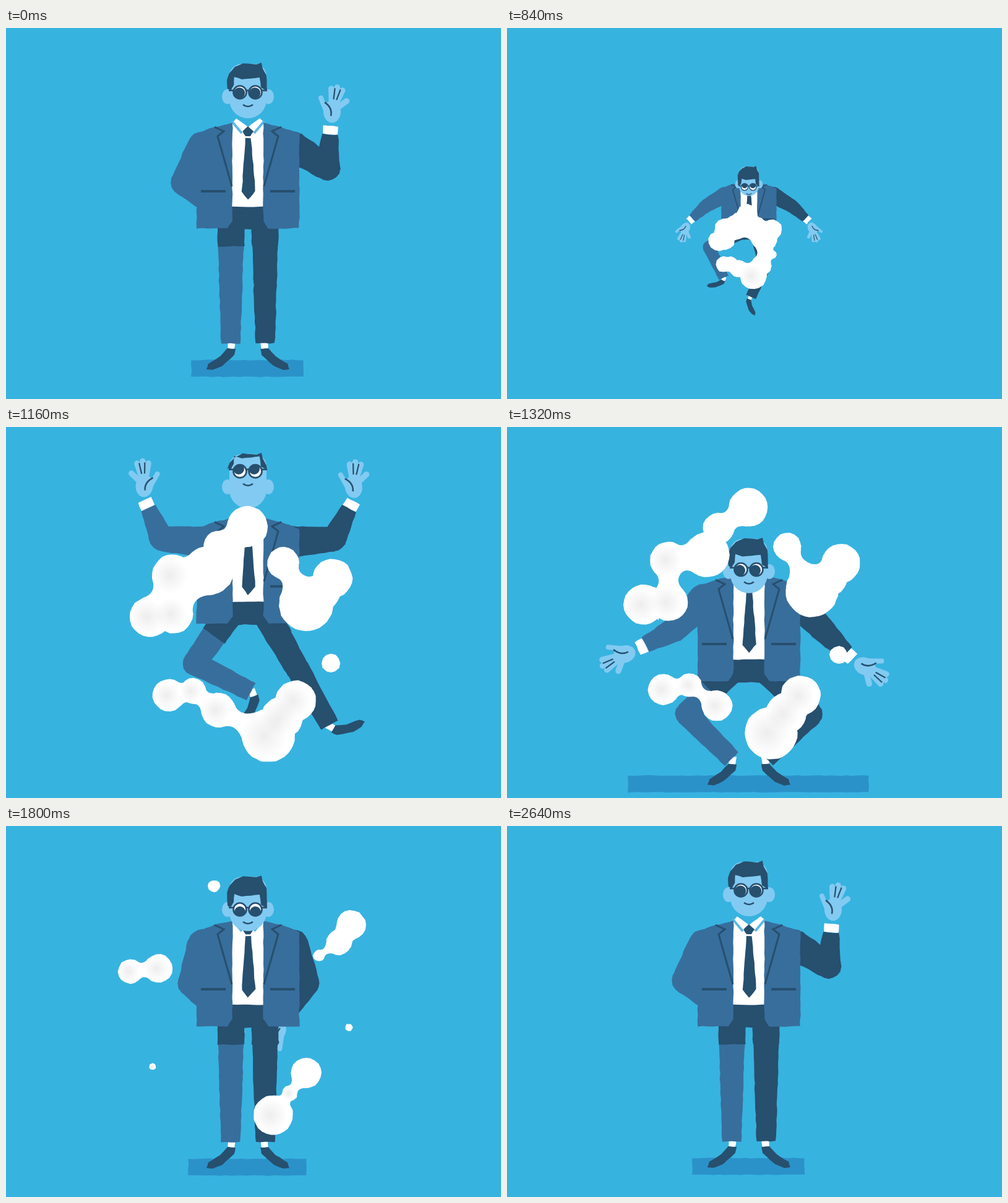
Recreate the animation shown at these times as an HTML page with a canvas. Size 800 by 600 pixels, loop 2680 ms.

```html
<!DOCTYPE html>
<html lang="en">
<head>
<meta charset="utf-8">
<title>Jumping in to say hello</title>
<style>
html, body { margin: 0; width: 100%; height: 100%; overflow: hidden; background: #37b3e0; }
canvas { display: block; width: 100vw; height: 100vh; }
</style>
</head>
<body>
<canvas id="stage" width="800" height="600"></canvas>
<script>
const ctx = document.getElementById('stage').getContext('2d');
const LOOP = 2680, STEP = 40, MID = 391;
const EXIT = 560, ENTER = 680, LEAP = 1160, LAND = 1360;
const BG = '#37b3e0', SUIT = '#386e9c', DARK = '#274f6e', SKIN = '#82caf1',
      ACCENT = '#5db8e4', FLOOR = '#2b92c9', WHITE = '#fff';

// Key poses. head: drop, tilt; gaze: pupil shift; arms: upper angle, forearm angle,
// hand turn; legs: ankle x, y, foot turn. Left limbs are given mirrored.
const STANDING = [419, 510, 0];
const POSES = [
  { time: 840, head: [48, 15], gaze: [0, -5],
    leftArm: [30, 42, 150], rightArm: [30, 42, 150], leftLeg: [467, 441, -21], rightLeg: [397, 499, 31] },
  { time: LEAP, head: [-8, -18], gaze: [-2, -4],
    leftArm: [-4, -66, -8], rightArm: [-4, -63, -8], leftLeg: [386, 428, 26], rightLeg: [523, 482, -53] },
  { time: 1440, head: [64, 18], gaze: [-2, 5],
    leftArm: [79, 88, 180], rightArm: [79, 115, 190], leftLeg: STANDING, rightLeg: STANDING },
  { time: 1800, head: [24, 7], gaze: [0, 4],
    leftArm: [72, 130, 260], rightArm: [70, 121, 210], leftLeg: STANDING, rightLeg: STANDING },
  { time: 2000, head: [0, 0], gaze: [-.8, 1.2],
    leftArm: [61, 137, 250], rightArm: [32, -86, 0], leftLeg: STANDING, rightLeg: STANDING }
];

// Puffs of the burst: x, y, radius, life in ms
const PUFFS = [
  [390, 161, 33, 520], [345, 193, 26, 690], [328, 232, 40, 390], [270, 240, 34, 330],
  [233, 307, 33, 800], [271, 303, 31, 960], [448, 220, 26, 330], [485, 286, 44, 655],
  [528, 245, 32, 960], [512, 268, 28, 960], [525, 382, 15, 700], [263, 434, 26, 655],
  [302, 427, 21, 400], [343, 458, 28, 345], [424, 499, 43, 960], [468, 443, 33, 960], [446, 470, 34, 690]
];

const ramp = (t, from, to) => Math.min(1, Math.max(0, (t - from) / (to - from)));
const smooth = (t, from, to) => { const u = ramp(t, from, to); return u * u * (3 - 2 * u); };
const mix = (a, b, u) => a + (b - a) * u;
const rad = deg => deg * Math.PI / 180;
const polar = (p, deg, len) => [p[0] + len * Math.cos(rad(deg)), p[1] + len * Math.sin(rad(deg))];

function poseAt(t) {
  const n = Math.max(1, POSES.findIndex(p => p.time > t));
  const i = t >= POSES.at(-1).time ? POSES.length - 1 : n;
  const a = POSES[i - 1], b = POSES[i], u = smooth(t, a.time, b.time), pose = {};
  for (const key in a) if (key !== 'time') pose[key] = a[key].map((v, k) => mix(v, b[key][k], u));
  const swing = 1.7 * smooth(t, 1800, 2000) * (1 - smooth(t, 2000, 2320));
  [16, 20, 38].forEach((amount, k) => pose.rightArm[k] += amount * swing);
  return pose;
}

// Up a little, free fall, then push up out of the squat
function bodyY(t) {
  if (t < 1080) return -18 * smooth(t, 840, 1080);
  if (t < LAND) return mix(-18, 125, ramp(t, 1080, LAND) ** 2);
  return 125 * (1 - smooth(t, LAND + 20, 1790));
}

const impact = t => t < LAND ? 36 * smooth(t, 1240, LAND) : 36 * Math.exp((LAND - t) / 130);

// Hand-cut edges: fixed wobble plus a faint boil
let seed = 0, tick = 0;
const hash = n => { const s = Math.sin(n * 127.1) * 43758.5453; return s - Math.floor(s) - .5; };
const wobble = amp => { seed++; return amp * (hash(seed) * 1.4 + hash(seed + tick * 17.3) * .3); };

function shape(points, color, amp = .9) {
  ctx.beginPath();
  points.forEach((p, i) => {
    const q = points[(i + 1) % points.length];
    const n = Math.ceil(Math.hypot(q[0] - p[0], q[1] - p[1]) / 9) || 1;
    for (let k = 0; k < n; k++)
      ctx.lineTo(mix(p[0], q[0], k / n) + wobble(amp), mix(p[1], q[1], k / n) + wobble(amp));
  });
  ctx.fillStyle = color;
  ctx.fill();
}

function disc(x, y, r, color) {
  const n = Math.max(12, Math.round(r * .8));
  shape(Array.from({ length: n }, (_, i) => polar([x, y], i / n * 360, r)), color);
}

function ellipse(x, y, rx, ry, color) {
  ctx.beginPath();
  ctx.ellipse(x, y, rx, ry, 0, 0, 7);
  ctx.fillStyle = color;
  ctx.fill();
}

const box = (x, y, w, h, color) => shape([[x, y], [x + w, y], [x + w, y + h], [x, y + h]], color);

function line(points, color, width, cap = 'butt') {
  ctx.beginPath();
  points.forEach(p => ctx.lineTo(...p));
  ctx.strokeStyle = color;
  ctx.lineWidth = width;
  ctx.lineCap = cap;
  ctx.stroke();
}

function curve(a, c, b) {
  ctx.beginPath();
  ctx.moveTo(...a);
  ctx.quadraticCurveTo(...c, ...b);
  ctx.strokeStyle = DARK;
  ctx.lineWidth = 2.5;
  ctx.stroke();
}

function bone(a, b, ra, rb, color) {
  const deg = Math.atan2(b[1] - a[1], b[0] - a[0]) * 180 / Math.PI;
  shape([polar(a, deg + 90, ra), polar(b, deg + 90, rb), polar(b, deg - 90, rb), polar(a, deg - 90, ra)], color);
}

function placed([x, y], turn, draw) {
  ctx.save();
  ctx.translate(x, y);
  ctx.rotate(rad(turn));
  draw();
  ctx.restore();
}

function mirrored(draw) {
  ctx.save();
  ctx.translate(2 * MID, 0);
  ctx.scale(-1, 1);
  draw();
  ctx.restore();
}

function hand() {
  const palm = [2, -20];
  ellipse(...palm, 14, 18, SKIN);
  for (const [deg, length] of [[-92, 37], [-78, 40], [-64, 38], [-36, 29]])
    line([palm, polar(palm, deg, length)], SKIN, 9.5, 'round');
  line([[-5, -14], [-16, -42]], SKIN, 8, 'round');
  for (const deg of [-83, -69]) line([polar(palm, deg, 20), polar(palm, deg, 38)], DARK, 2.2);
  curve([-10, -35], [3, -26], [0, -13]);
}

function arm([upper, fore, turn], dy, color) {
  const shoulder = [464, 192 + dy], elbow = polar(shoulder, upper, 66);
  const wrist = polar(elbow, fore, 55), cuff = polar(wrist, fore, 14);
  placed(polar(cuff, fore, 3), turn, hand);
  bone(wrist, cuff, 12, 11.5, WHITE);
  disc(...shoulder, 25, color);
  bone(shoulder, elbow, 25, 20, color);
  disc(...elbow, 20, color);
  bone(elbow, wrist, 20, 13, color);
}

function foot() {
  shape([[-8, -3], [4, -3], [5, 10], [-6, 10]], WHITE, .4);
  shape([[-8, 9], [5, 8], [17, 21], [36, 33], [39, 42], [29, 43], [14, 37], [-6, 19]], DARK, .5);
}

function leg([x, y, turn], dy, color) {
  const hip = [418.5, 305 + dy], ankle = [x, y], half = 102.5;
  const dx = x - hip[0], drop = y - hip[1], reach = Math.hypot(dx, drop);
  const bend = Math.sqrt(Math.max(0, half * half - reach * reach / 4)) / reach;
  const knee = [hip[0] + dx / 2 + drop * bend, hip[1] + drop / 2 - dx * bend];
  placed(ankle, turn, foot);
  bone(hip, knee, 22, 19, color);
  disc(...knee, 19, color);
  bone(knee, ankle, 19, 15.5, color);
  bone(hip, [mix(hip[0], knee[0], .47), mix(hip[1], knee[1], .47)], 22, 21.5, DARK);
}

function jacketSide() {
  line([[417, 151], [401, 170]], ACCENT, 4);
  shape([[416, 153], [445, 160], [474, 171], [474, 324], [424, 324], [416, 312]], SUIT);
  line([[445, 160], [430, 167], [440, 175], [417, 256]], DARK, 3);
  line([[427, 264], [467, 264]], DARK, 4);
}

function torso() {
  box(342, 284, 98, 42, DARK);
  shape([[372, 146], [391, 160], [410, 146], [417, 153], [417, 289], [365, 289], [365, 153]], WHITE, .6);
  shape([[391, 159], [400, 167], [395, 175], [387, 175], [382, 167]], DARK, .4);
  shape([[387, 178], [396, 178], [403, 264], [391, 278], [381, 265]], DARK, .6);
  jacketSide();
  mirrored(jacketSide);
}

function lens(x, y, gaze, closed) {
  ctx.save();
  ellipse(x, y, 10.5, 10.5, WHITE);
  ctx.clip();
  if (closed) line([[x - 10, y + 1], [x + 10, y + 1]], DARK, 2.4);
  else ellipse(x + gaze[0], y + gaze[1], 9, 9, DARK);
  ctx.restore();
  ctx.beginPath();
  ctx.arc(x, y, 10.5, 0, 7);
  ctx.strokeStyle = DARK;
  ctx.lineWidth = 2.6;
  ctx.stroke();
}

function head(tilt, gaze, closed) {
  for (const x of [358, 424]) ellipse(x, 111, 9, 12, SKIN);
  ctx.beginPath();
  ctx.roundRect(361, 58, 60, 88, [20, 20, 30, 30]);
  ctx.fill();
  const brow = y => Math.max(y + tilt, 61);
  shape([[358, brow(98)], [357, 84], [361, 73], [370, 63], [383, 57], [405, 59], [413, 56], [415, 66],
    [421, 76], [422, brow(102)], [412, brow(96)], [410, brow(80)], [381, brow(83)],
    [369, brow(79)], [368, brow(92)], [363, brow(101)]], DARK, .4);
  ctx.save();
  ctx.translate(0, tilt);
  for (const [from, to] of [[360, 368], [388, 393], [413, 422]]) line([[from, 101], [to, 101]], DARK, 2.6);
  for (const x of [378, 403]) lens(x, 104, gaze, closed);
  curve([383, 124], [391, 130], [399, 124]);
  ctx.restore();
}

function person(t) {
  const pose = poseAt(t), dy = bodyY(t), sink = impact(t);
  const scale = Math.sin(ramp(t, ENTER - 20, LEAP) * Math.PI / 2);
  for (const side of ['leftLeg', 'rightLeg']) {
    const landed = smooth(t, LEAP, 1320);
    if (t > LEAP) pose[side] = POSES[1][side].map((v, k) => mix(v, STANDING[k], landed));
    pose[side][1] += sink;
  }
  if (t >= 1280) {
    const half = 90.5 + sink * 3.9;
    box(390 - half, 537 + sink, half * 2, 27, FLOOR);
  }
  ctx.save();
  ctx.translate(MID, 361);
  ctx.scale(scale, scale);
  ctx.translate(-MID, -361);
  mirrored(() => arm(pose.leftArm, dy, SUIT));
  arm(pose.rightArm, dy, DARK);
  mirrored(() => leg(pose.leftLeg, dy, SUIT));
  leg(pose.rightLeg, dy, DARK);
  ctx.translate(0, dy);
  torso();
  ctx.translate(0, pose.head[0]);
  head(pose.head[1], pose.gaze, t >= 2080 && t < 2200);
  ctx.restore();
}

// Burst out of the middle, then spread, rise and shrink away
function puffAt([x, y, r, life], t) {
  const age = Math.max(0, t - LEAP), burst = smooth(t, ENTER - 20, LEAP);
  const drift = Math.sin(Math.min(1, age / 640) * Math.PI / 2);
  const spread = burst * (1 + .21 * drift);
  const size = Math.sin(ramp(t, ENTER, LEAP) * Math.PI / 2) * Math.sqrt(Math.max(0, 1 - (age / life) ** 2));
  return [387 + (x - 387) * spread, 360 + (y - 360) * spread - .095 * age, r * size];
}

// Gooey neck between two neighbouring puffs
function bridge([x1, y1, r1], [x2, y2, r2]) {
  const d = Math.hypot(x2 - x1, y2 - y1), reach = (r1 + r2) * 1.3, small = Math.min(r1, r2);
  if (d > reach || d < Math.abs(r1 - r2) || small < 3) return;
  const thin = small * Math.min(.95, (1 - d / reach) * 2);
  const turn = Math.atan2(y2 - y1, x2 - x1) * 180 / Math.PI;
  placed([x1, y1], turn, () => {
    const a = polar([0, 0], 52, r1), b = polar([d, 0], 128, r2), mid = (r1 + d - r2) / 2;
    ctx.beginPath();
    ctx.moveTo(a[0], -a[1]);
    ctx.quadraticCurveTo(mid, -thin, b[0], -b[1]);
    ctx.lineTo(...b);
    ctx.quadraticCurveTo(mid, thin, ...a);
    ctx.fillStyle = WHITE;
    ctx.fill();
  });
}

function clouds(t) {
  const puffs = PUFFS.map(p => puffAt(p, t)).filter(p => p[2] > 1);
  puffs.forEach((p, i) => {
    disc(...p, WHITE);
    puffs.slice(i + 1).forEach(q => bridge(p, q));
  });
  for (const [x, y, r] of puffs) {
    if (x > 300 && y < 400) continue;
    const glow = ctx.createRadialGradient(x - r * .15, y, 0, x - r * .15, y, r * .85);
    glow.addColorStop(0, 'rgba(60,60,60,.09)');
    glow.addColorStop(1, 'rgba(60,60,60,0)');
    ellipse(x, y, r, r, glow);
  }
}

function render(now) {
  const t = Math.floor(now % LOOP / STEP) * STEP;
  seed = 0;
  tick = t / STEP;
  ctx.fillStyle = BG;
  ctx.fillRect(0, 0, 800, 600);
  if (t < EXIT) person(t + LOOP);
  else if (t >= ENTER) {
    person(t);
    clouds(t);
  }
}

const start = performance.now();
function loop() {
  render(performance.now() - start);
  requestAnimationFrame(loop);
}
loop();
</script>
</body>
</html>
```
